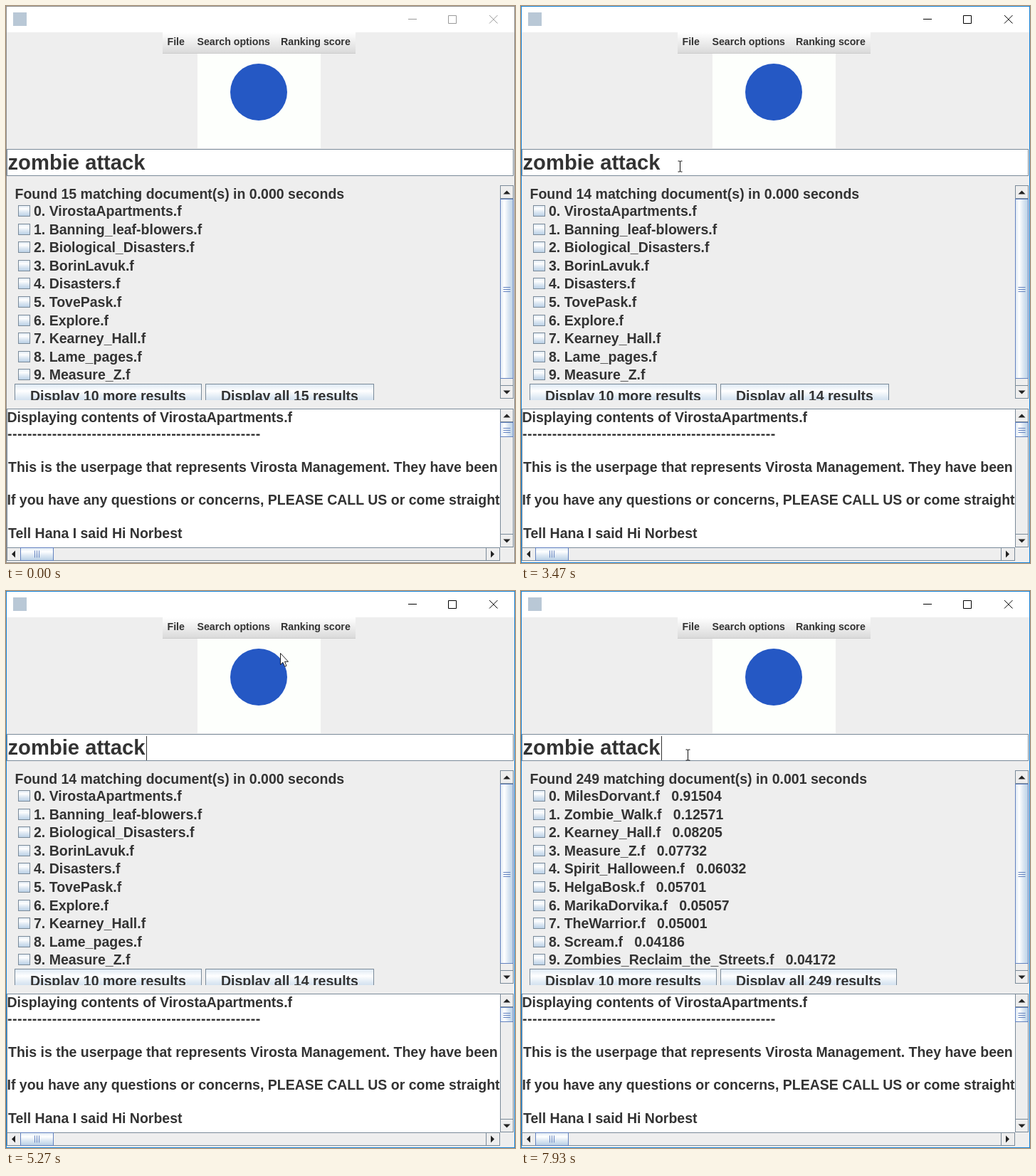
Animation, 715 px wide and 783 px high, one loop 8 s. Source, as an HTML page:

```html
<!DOCTYPE html>
<html lang="en">
<head>
<meta charset="utf-8">
<title>Document search</title>
<style>
  html, body { margin: 0; width: 100%; height: 100%; overflow: hidden; background: #eee; }
  svg { display: block; }
  text { font: bold 19.5px "Liberation Sans", Arial, sans-serif; fill: #333; white-space: pre; }
  .menu { font-size: 14.2px; }
  .query { font-size: 29.2px; }
  .rule { letter-spacing: .48px; }
</style>
</head>
<body>
<svg id="stage" width="715" height="783" viewBox="0 0 715 783">
  <defs>
    <linearGradient id="down" x2="0" y2="1">
      <stop stop-color="#dde8f3"/><stop offset=".3" stop-color="#fff"/>
      <stop offset=".6" stop-color="#dde8f3"/><stop offset="1" stop-color="#b8cfe5"/>
    </linearGradient>
    <linearGradient id="across">
      <stop stop-color="#dde8f3"/><stop offset=".3" stop-color="#fff"/>
      <stop offset=".6" stop-color="#dde8f3"/><stop offset="1" stop-color="#b8cfe5"/>
    </linearGradient>
    <linearGradient id="bar" x2="0" y2="1">
      <stop stop-color="#fff"/><stop offset="1" stop-color="#dadada"/>
    </linearGradient>
    <clipPath id="listClip"><rect x="2" y="252" width="692" height="302"/></clipPath>
    <clipPath id="pageClip"><rect x="1" y="567" width="693" height="193"/></clipPath>
  </defs>
</svg>
<script>
const stage = document.getElementById('stage');
const EDGE = '#7a8a99', BLUE = '#6382bf', PICK = '#a3b8cc', INK = '#333';

function add(parent, tag, attrs) {
  const el = document.createElementNS('http://www.w3.org/2000/svg', tag);
  for (const key in attrs) el.setAttribute(key, attrs[key]);
  return parent.appendChild(el);
}
const group = (parent, attrs) => add(parent, 'g', attrs);
const fill = (parent, x, y, width, height, color) =>
  add(parent, 'rect', { x, y, width, height, fill: color });
// One-pixel outline whose outer edges are the given ones.
const box = (parent, x, y, width, height, color, edge = EDGE) =>
  add(parent, 'rect', { x: x + .5, y: y + .5, width: width - 1, height: height - 1, fill: color, stroke: edge });
const path = (parent, d, attrs) => add(parent, 'path', { d, ...attrs });
function label(parent, x, y, content, cls = '') {
  const el = add(parent, 'text', { x, y, class: cls });
  el.textContent = content;
  return el;
}
const show = (el, on) => el.setAttribute('visibility', on ? 'visible' : 'hidden');

// Window frame
fill(stage, 0, 0, 715, 783, '#eee');
fill(stage, 0, 0, 715, 37, '#fff');
fill(stage, 10, 9, 19, 19, '#b9c8d6');
const controls = path(stage, 'M565 18.5h12M621.5 13.5h11v11h-11zM679 13l11.5 11.5M690.5 13L679 24.5', { fill: 'none' });

// Menu bar and logo panel
fill(stage, 220, 37, 271, 29, 'url(#bar)');
fill(stage, 220, 66, 271, 1, '#ccc');
fill(stage, 269, 67, 173, 133, '#fdfffc');
add(stage, 'circle', { cx: 355, cy: 121, r: 40, fill: '#2558c4' });

// Query field
box(stage, 1, 201, 712, 38, '#fff');
label(stage, 2.5, 230, 'zombie attack', 'query');
const caret = fill(stage, 197, 204, 1, 34, INK);

// Result list
const list = group(stage, { 'clip-path': 'url(#listClip)' });
const found = label(list, 12.5, 271, '');
const rows = [];
for (let i = 0; i < 10; i++) {
  const y = 295 + 25.6 * i;
  box(list, 17, Math.round(y - 15), 17, 16, 'url(#down)');
  rows.push(label(list, 39, y, ''));
}
box(list, 12, 531, 263, 33, 'url(#down)');
label(list, 34, 555, 'Display 10 more results');
const allButton = box(list, 280, 531, 237, 33, 'url(#down)');
const allLabel = label(list, 302, 555, '');

// Page view
fill(stage, 1, 566, 693, 195, '#fff');
fill(stage, 1, 566, 712, 1, EDGE);
fill(stage, 1, 566, 1, 214, EDGE);
const page = group(stage, { 'clip-path': 'url(#pageClip)' });
label(page, 1.5, 585, 'Displaying contents of VirostaApartments.f');
label(page, 2, 608, '-'.repeat(51), 'rule');
label(page, 3, 655, 'This is the userpage that represents Virosta Management. They have been');
label(page, 1.5, 701, 'If you have any questions or concerns, PLEASE CALL US or come straight');
label(page, 3, 748, 'Tell Hana I said Hi Norbest');

// Scroll bars
const arrow = (x, y, turn) =>
  path(stage, 'M-5 2.5L0 -2.5L5 2.5Z', { transform: `translate(${x} ${y}) rotate(${turn})`, fill: '#222' });
const grip = (x, y, turn) =>
  path(stage, 'M-5 -2.5h10M-5 .5h10M-5 3.5h10', { transform: `translate(${x} ${y}) rotate(${turn})`, stroke: BLUE });

function verticalBar(top, bottom, thumbTop, thumbEnd) {
  box(stage, 694, top, 19, bottom - top, '#eee');
  box(stage, 694, top, 19, 19, '#eee');
  box(stage, 694, bottom - 19, 19, 19, '#eee');
  arrow(703.5, top + 10, 0);
  arrow(703.5, bottom - 9, 180);
  box(stage, 694, thumbTop, 19, thumbEnd - thumbTop, 'url(#across)', BLUE);
  grip(703.5, Math.round((thumbTop + thumbEnd) / 2), 0);
}
verticalBar(252, 552, 271, 524);
verticalBar(566, 761, 585, 606);
box(stage, 1, 761, 693, 19, '#eee');
box(stage, 1, 761, 20, 19, '#eee');
box(stage, 674, 761, 20, 19, '#eee');
arrow(10.5, 770.5, -90);
arrow(683.5, 770.5, 90);
box(stage, 20, 761, 47, 19, 'url(#down)', BLUE);
grip(44, 770.5, 90);

// Menus
const ROW = 27.5, TOP = 68;

function dropMenu(x, headWidth, width, items) {
  const root = group(stage);
  box(root, x, 37, headWidth, 29, PICK);
  const height = items.length * ROW + 6;
  box(root, x, 64, width, Math.round(height), '#eee', BLUE);
  const entries = items.map((name, i) => {
    const y = Math.round(TOP + ROW * i), mid = 81 + 27.8 * i;
    const back = fill(root, x + 1, y, width - 2, 27, PICK);
    add(root, 'circle', { cx: x + 13.5, cy: mid, r: 5, fill: 'url(#down)', stroke: EDGE });
    const dot = add(root, 'circle', { cx: x + 13.5, cy: mid, r: 3, fill: INK });
    label(root, x + 25.5, mid + 6, name, 'menu');
    return { back, dot };
  });
  return (open, px, py, chosen) => {
    root.setAttribute('display', open ? 'inline' : 'none');
    const inside = px >= x && px < x + width && py >= TOP;
    const hover = inside ? Math.floor((py - TOP) / ROW) : -1;
    entries.forEach((entry, i) => {
      show(entry.back, i === hover);
      show(entry.dot, i === chosen);
    });
  };
}
const searchMenu = dropMenu(260, 117, 172, ['Intersection query', 'Phrase query', 'Ranked retrieval']);
const scoreMenu = dropMenu(378, 112, 133, ['tf-idf', 'PageRank', 'Combination', 'HITS']);
label(stage, 226.5, 54.5, 'File', 'menu');
label(stage, 268.5, 54.5, 'Search options', 'menu');
label(stage, 386, 54.5, 'Ranking score', 'menu');

const frame = box(stage, 0, 0, 715, 783, 'none');

// Pointers
const pointer = path(stage, 'M.5 .5V16.5L4 13.3L6.6 19.2L9 18.2L6.5 12.3H11.5Z', { fill: '#fff', stroke: '#222' });
const beam = path(stage, 'M-3 -7.5h2.5l.5 .5l.5 -.5h2.5M0 -7.5V7.5M-3 7.5h2.5l.5 -.5l.5 .5h2.5', { fill: 'none', stroke: '#111' });

// All times below are in ticks of 1/15 s.
const TICK = 1000 / 15, LOOP = 8000;
const track = [
  [4, 594, 252], [7, 430, 135], [10, 325, 62], [12, 308, 53], [18, 308, 53],
  [25, 305, 109], [28, 305, 109], [29, 305, 111], [32, 230, 222], [34, 230, 222],
  [35, 223, 225], [53, 223, 225], [60, 315, 45], [64, 315, 45], [65, 316, 50],
  [68, 329, 122], [70, 331, 134], [74, 331, 134], [83, 428, 50], [86, 428, 50],
  [92, 441, 85], [95, 441, 85], [101, 234, 230], [120, 234, 230]
];
const caretOn = [[29, 37], [44, 52], [59, 64], [75, 83], [104, 111], [119, 120]];
const within = (t, spans) => spans.some(([from, to]) => t >= from && t < to);

function position(t) {
  const i = track.findIndex(p => p[0] > t);
  if (i < 1) return [-50, -50];
  const [t0, x0, y0] = track[i - 1], [t1, x1, y1] = track[i];
  const k = (t - t0) / (t1 - t0);
  return [Math.round(x0 + (x1 - x0) * k), Math.round(y0 + (y1 - y0) * k)];
}

const plain = ['VirostaApartments', 'Banning_leaf-blowers', 'Biological_Disasters', 'BorinLavuk', 'Disasters',
  'TovePask', 'Explore', 'Kearney_Hall', 'Lame_pages', 'Measure_Z'].map(name => name + '.f');
const ranked = [
  ['MilesDorvant', '0.91504'], ['Zombie_Walk', '0.12571'], ['Kearney_Hall', '0.08205'],
  ['Measure_Z', '0.07732'], ['Spirit_Halloween', '0.06032'], ['HelgaBosk', '0.05701'],
  ['MarikaDorvika', '0.05057'], ['TheWarrior', '0.05001'], ['Scream', '0.04186'],
  ['Zombies_Reclaim_the_Streets', '0.04172']
].map(([name, score]) => `${name}.f   ${score}`);

let lastCount = 0;
function fillResults(count, seconds, names) {
  if (count === lastCount) return;
  lastCount = count;
  found.textContent = `Found ${count} matching document(s) in ${seconds} seconds`;
  rows.forEach((row, i) => { row.textContent = `${i}. ${names[i]}`; });
  allLabel.textContent = `Display all ${count} results`;
  allButton.setAttribute('width', count > 99 ? 247 : 236);
}

function draw(ms) {
  const t = Math.floor((ms + 4) / TICK) % 120;
  const active = t >= 16;
  controls.setAttribute('stroke', active ? '#000' : '#999');
  frame.setAttribute('stroke', active ? '#1883d7' : '#8c8c8c');

  if (t < 46) fillResults(15, '0.000', plain);
  else if (t < 114) fillResults(14, '0.000', plain);
  else fillResults(249, '0.001', ranked);

  const [x, y] = position(t);
  searchMenu(within(t, [[16, 29], [64, 75]]), x, y, t < 29 ? 0 : 1);
  scoreMenu(within(t, [[84, 103]]), x, y, 0);
  show(caret, within(t, caretOn));

  const typing = y > 201 && y < 239;
  show(pointer, !typing);
  show(beam, typing);
  pointer.setAttribute('transform', `translate(${x} ${y})`);
  beam.setAttribute('transform', `translate(${x + .5} ${y + .5})`);
}

const start = performance.now();
function loop() {
  draw((performance.now() - start) % LOOP);
  requestAnimationFrame(loop);
}
loop();
</script>
</body>
</html>
```
